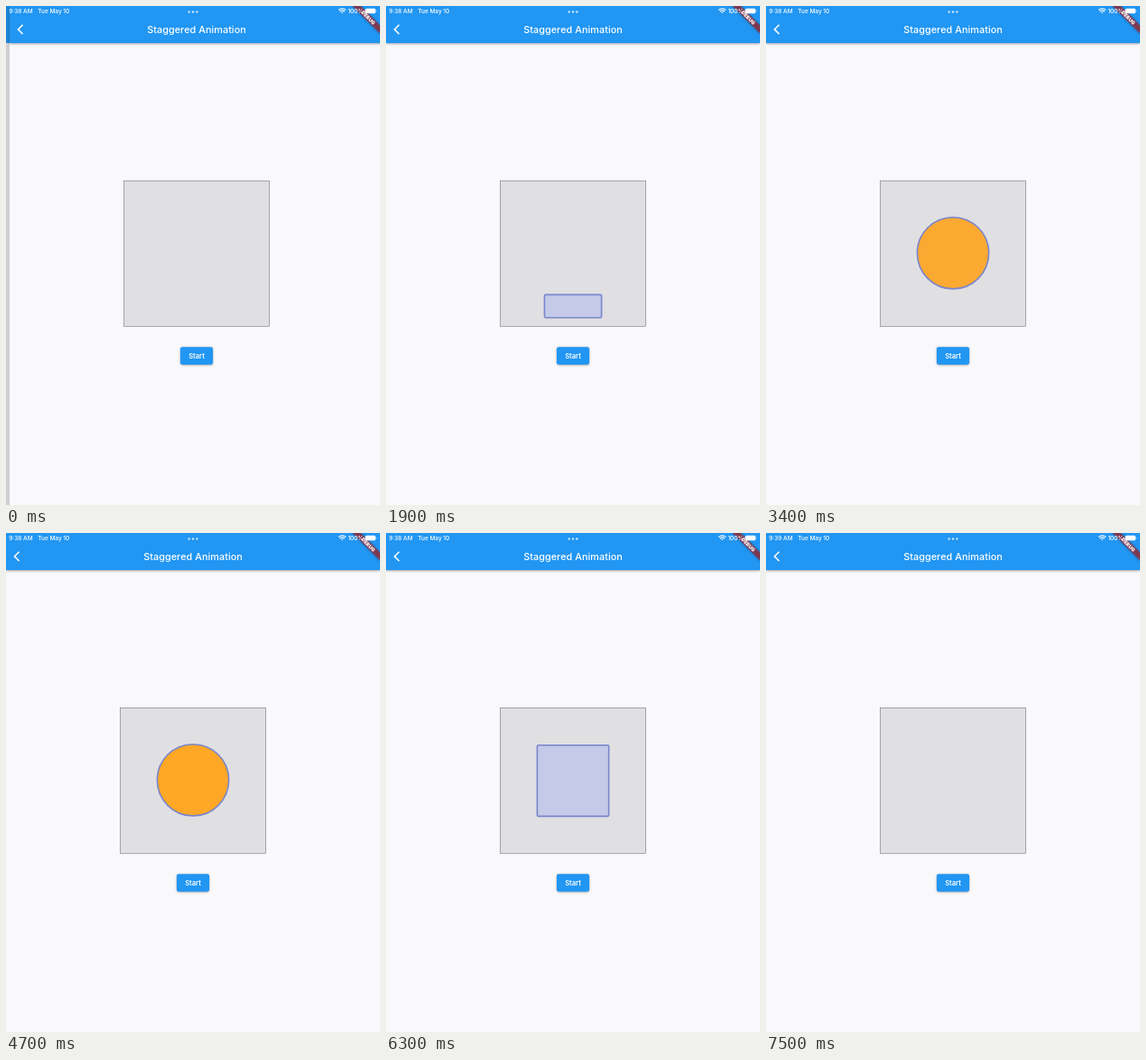
These frames come from a looping animation (414x552 px, 8000 ms). An HTML page:

```html
<!DOCTYPE html>
<html lang="en">
<head>
<meta charset="utf-8">
<title>Staggered Animation</title>
<style>
  html, body { margin: 0; width: 100%; height: 100%; overflow: hidden; background: #f9f8fb; }
  svg { display: block; width: 100vw; height: 100vh; font-family: Inter, Roboto, sans-serif; }
  text { fill: #fff; }
  .bar { fill: #2196f3; filter: drop-shadow(0 2px 2px rgba(0, 0, 0, .32)); }
  .button { fill: #2196f3; }
  .title { font-size: 20px; font-weight: 500; letter-spacing: .15px; text-anchor: middle; }
  .label { font-size: 14px; font-weight: 600; text-anchor: middle; }
  .status text { font-size: 12px; font-weight: 500; }
  .banner text { font-size: 10.2px; font-weight: 900; text-anchor: middle; }
</style>
</head>
<body>
<svg viewBox="0 0 768 1024">
  <defs>
    <clipPath id="buttonClip"><rect x="350.5" y="700" width="67" height="36" rx="4"/></clipPath>
  </defs>

  <!-- previous page, seen while the current one finishes sliding in -->
  <rect width="768" height="1024" fill="#cfcfd2"/>
  <rect width="768" height="76" fill="#1e86da"/>

  <g id="page">
    <rect width="768" height="1024" fill="#f9f8fb"/>
    <rect class="bar" width="768" height="76"/>
    <path d="M27 38.5L17.5 48L27 57.5" fill="none" stroke="#fff" stroke-width="3"/>
    <text class="title" x="384" y="55">Staggered Animation</text>

    <rect x="234" y="358" width="300" height="300" fill="#000" fill-opacity=".1"/>
    <rect x="234.5" y="358.5" width="299" height="299" fill="none" stroke="#000" stroke-opacity=".5"/>
    <rect id="shape" stroke="#7986cb" stroke-width="3"/>

    <rect id="button" class="button" x="350.5" y="700" width="67" height="36" rx="4"/>
    <circle id="ripple" cx="384" cy="718" fill="#fff" clip-path="url(#buttonClip)"/>
    <text class="label" x="384" y="723">Start</text>
  </g>

  <g class="banner" transform="translate(768 0) rotate(45)">
    <rect x="-40" y="28" width="80" height="12" fill="#b71c1c" fill-opacity=".63"
      style="filter: drop-shadow(0 0 3px rgba(0, 0, 0, .5))"/>
    <text y="37.7">DEBUG</text>
  </g>

  <g class="status">
    <text id="clock" x="6" y="14.5">9:38 AM</text>
    <text x="65.5" y="14.5">Tue May 10</text>
    <g fill="#fff" fill-opacity=".75">
      <circle cx="376" cy="12" r="2.3"/><circle cx="384" cy="12" r="2.3"/><circle cx="392" cy="12" r="2.3"/>
    </g>
    <g fill="none" stroke="#fff" stroke-width="2.2">
      <path d="M683 8.5Q690.5 2.5 698 8.5M685.8 11.5Q690.5 7.8 695.2 11.5"/>
      <path d="M690.5 15.5L688.6 13.4Q690.5 11.9 692.4 13.4Z" fill="#fff" stroke="none"/>
    </g>
    <text x="702" y="14.5">100%</text>
    <rect x="737.5" y="5" width="21.5" height="10.5" rx="3" fill="#fff"/>
    <rect x="760" y="8.5" width="1.6" height="3.5" rx=".8" fill="#fff" fill-opacity=".6"/>
  </g>
</svg>

<script>
const LOOP = 8000, TICK = 100;
const TAP = 1300, START = 1370, RUN = 3000;
const INDIGO = [197, 202, 233], ORANGE = [255, 167, 38];

const [page, shape, button, ripple, clock] =
  ['page', 'shape', 'button', 'ripple', 'clock'].map(id => document.getElementById(id));

const clamp = v => Math.min(1, Math.max(0, v));
const lerp = (a, b, k) => a + (b - a) * k;
const set = (el, attrs) => Object.entries(attrs).forEach(([k, v]) => el.setAttribute(k, v));

// cubic-bezier(.25, .1, .25, 1), solved by bisection
function ease(x) {
  if (x <= 0 || x >= 1) return clamp(x);
  const curve = (a, b, u) => 3 * a * u * (1 - u) ** 2 + 3 * b * u * u * (1 - u) + u ** 3;
  let lo = 0, hi = 1;
  for (let i = 0; i < 24; i++) {
    const mid = (lo + hi) / 2;
    if (curve(.25, .25, mid) < x) lo = mid; else hi = mid;
  }
  return curve(.1, 1, lo);
}

function drawShape(value) {
  const stage = (from, to) => ease(clamp((value - from) / (to - from)));
  const rise = stage(.25, .375);
  const width = lerp(50, 150, stage(.125, .25));
  const height = lerp(50, 150, rise);
  const bottom = 657 - lerp(16, 75, rise);
  const tint = stage(.5, .75);
  const inset = 1.5;
  const radius = Math.min(lerp(4, 75, stage(.375, .5)), width / 2, height / 2);
  set(shape, {
    x: 384 - width / 2 + inset,
    y: bottom - height + inset,
    width: width - 2 * inset,
    height: height - 2 * inset,
    rx: radius - inset,
    fill: `rgb(${INDIGO.map((c, i) => Math.round(lerp(c, ORANGE[i], tint)))})`,
    opacity: stage(0, .1)
  });
}

function drawButton(t) {
  const grow = clamp((t - TAP + 75) / 225);
  const fade = 1 - clamp((t - TAP - 150) / 250);
  const pressed = t >= TAP ? fade : 0;
  set(ripple, { r: lerp(10, 38, grow), opacity: .24 * pressed });
  const lift = lerp(1.5, 4, pressed);
  button.style.filter = `drop-shadow(0 ${lift}px ${lift}px rgba(0, 0, 0, .35))`;
}

function render(time) {
  const t = Math.floor(time / TICK) * TICK;
  const progress = (t - START) / RUN;
  set(page, { transform: `translate(${t < 100 ? 7.4 : 0} 0)` });
  drawShape(clamp(progress < 1 ? progress : 2 - progress));
  drawButton(t);
  clock.textContent = t < 7000 ? '9:38 AM' : '9:39 AM';
}

const origin = performance.now();
function frame() {
  render((performance.now() - origin) % LOOP);
  requestAnimationFrame(frame);
}
frame();
</script>
</body>
</html>
```
